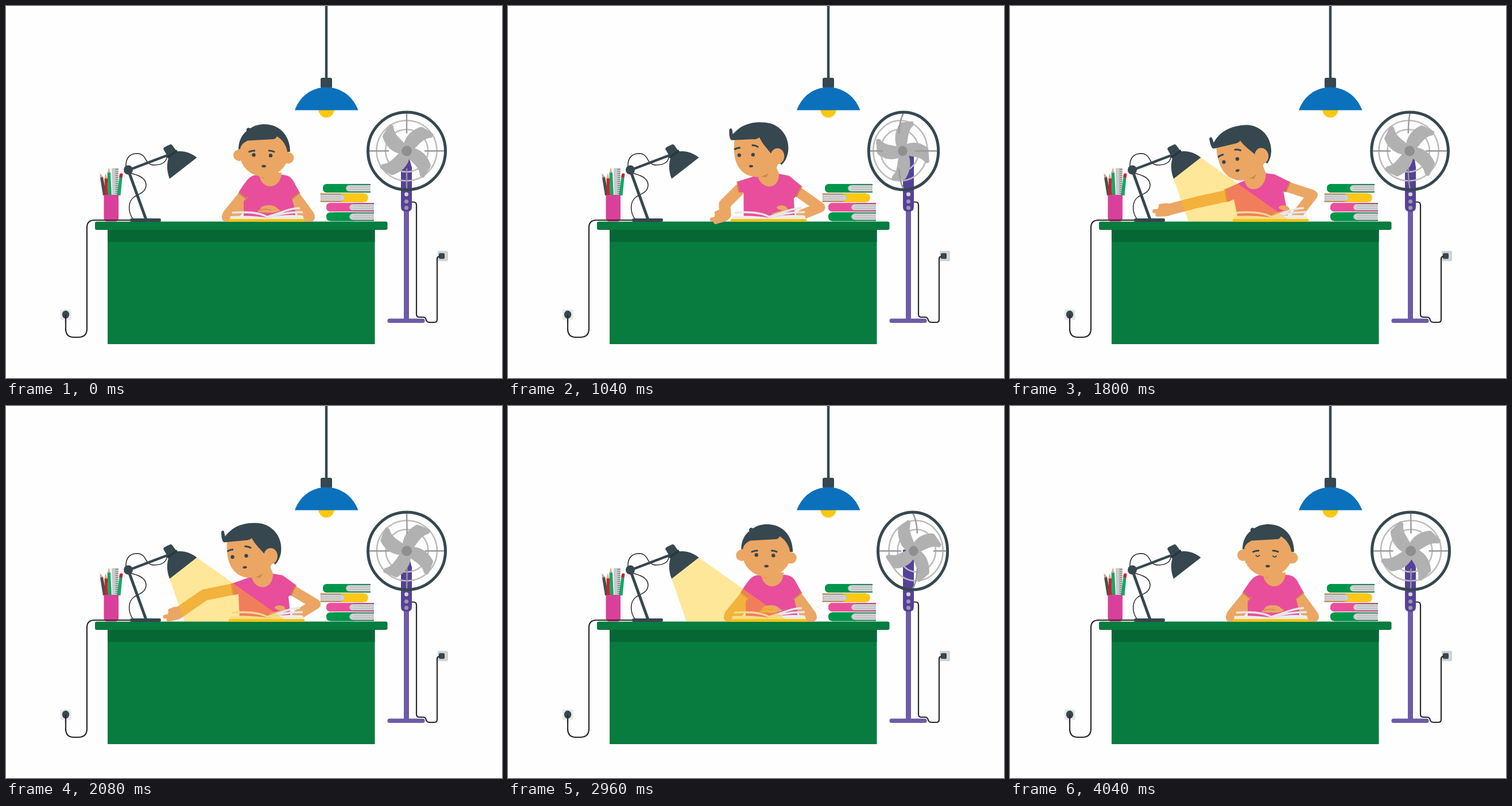
Write an HTML page that moves like this. It is 864 by 648 pixels and loops after 4.08 s.

```html
<!DOCTYPE html>
<html lang="en">
<head>
<meta charset="utf-8">
<title>Study desk</title>
<style>
html, body { margin: 0; width: 100%; height: 100%; overflow: hidden; background: #fefefe; }
svg { display: block; width: 100vw; height: 100vh; }
.dark { fill: #36474f; }
.skin { fill: #eba664; }
.shirt { fill: #e84e9b; }
.line { fill: none; stroke: #36474f; }
.wire { fill: none; stroke: #2b2729; stroke-width: 2.2; }
.limb { fill: none; stroke: #eba664; stroke-linecap: round; stroke-linejoin: round; }
.cuff { fill: none; stroke: #c98745; stroke-width: 5; }
.brow { fill: none; stroke: #36474f; stroke-width: 3; }
.page { fill: none; stroke: #e6e7e8; stroke-width: 3.5; }
</style>
</head>
<body>
<svg viewBox="0 0 864 648">
  <!-- pendant lamp -->
  <path class="line" d="M558 0V128" stroke-width="4.5"/>
  <rect class="dark" x="548" y="125" width="20" height="18" rx="3"/>
  <circle cx="558" cy="181" r="13.5" fill="#ffc80f"/>
  <path d="M503 181.5C513 154 536 141.5 558 141.5S603 154 613.5 181.5Z" fill="#0b71bc"/>

  <!-- fan stand -->
  <rect x="693" y="350" width="9" height="198" fill="#6d5ca8"/>
  <rect x="664.5" y="544.5" width="65" height="7.5" rx="3.5" fill="#6d5ca8"/>
  <path class="wire" d="M706 341.5H710Q715 341.5 715 347V537Q715 542 720 542H726Q731 542 732 547Q733 551 738 551H746Q751 551 751 546V441Q751 436 756 436"/>
  <rect x="752" y="426.5" width="18" height="18" rx="2" fill="#d1d3d4"/>
  <rect class="dark" x="754" y="430.5" width="10" height="10" rx="2"/>
  <path class="wire" d="M751 442V441Q751 436 756 436"/>
  <path d="M688 280H707V350Q707 358 699 358H696Q688 358 688 350Z" fill="#56419a"/>
  <path id="neck" fill="#56419a"/>
  <g fill="#9b97a8">
    <circle cx="697.5" cy="328" r="3.6" fill="#d1d3d4"/>
    <circle cx="697.5" cy="340.5" r="3.6"/>
    <circle cx="697.5" cy="351.5" r="3.6"/>
  </g>
  <g fill="none" stroke="#bcbcbc" stroke-width="2.6">
    <ellipse id="ringA" cy="252" ry="52.5"/>
    <ellipse id="ringB" cy="252" ry="37"/>
  </g>
  <g id="rotor" fill="#b1b1b1"></g>
  <path id="spokes" fill="none" stroke="#999" stroke-width="2.4"/>
  <ellipse id="hub" cy="252.5" ry="9" fill="#8f8f8f"/>
  <ellipse id="frame" class="line" cy="252.5" ry="67.5" stroke-width="5"/>

  <!-- desk -->
  <rect x="177" y="388" width="465.5" height="201" fill="#087b3e"/>
  <rect x="177" y="388" width="465.5" height="23" fill="#066735"/>
  <rect x="155" y="375.5" width="509.5" height="14.5" rx="3" fill="#087b3e"/>

  <!-- pencil cup -->
  <path d="M164 299L169 297.5 175 330H169Z" fill="#4d4d4d"/>
  <path d="M163.5 291L164 299.5 169 298Z" fill="#c9a07a"/>
  <path d="M171.5 300H177L178 330H172.5Z" fill="#c4262e"/>
  <path d="M173.5 291L171.5 300.5H177Z" fill="#d9b38c"/>
  <path d="M176.5 290H182L184 330H178Z" fill="#12a866"/>
  <path d="M179 281L176.5 290.5H182Z" fill="#d9b38c"/>
  <path d="M184 282.5L196 282 195.5 330H185Z" fill="#c9cbcc"/>
  <path d="M193 284V328" stroke="#666" stroke-width="5" stroke-dasharray="1 2.5"/>
  <path d="M197.5 298L202.5 299 199.5 330H193Z" fill="#12a866"/>
  <path d="M198 293Q200 290.5 203.5 292.5L202.5 299.5 197 298.5Z" fill="#c4262e"/>
  <path d="M170.5 329H196V369Q196 375.5 190 375.5H176.5Q170.5 375.5 170.5 369Z" fill="#d8409a"/>

  <!-- desk lamp -->
  <path class="wire" d="M220 373H154Q141 373 141 386V562Q141 577 126 577H118Q104 577 104 562V540"/>
  <rect x="95" y="528.5" width="18.5" height="18.5" rx="2" fill="#e6e7e8"/>
  <ellipse class="dark" cx="104" cy="537.5" rx="6.2" ry="7"/>
  <path class="wire" d="M104 552V538"/>
  <g class="wire" style="stroke-width:1.5">
    <path d="M209 281C208 264 216 257 229 257C247 258 240 277 258 277C274 277 280 270 280 262"/>
    <path d="M216 291C228 294 243 298 244 311C244 325 232 327 224 332C212 340 212 358 221 371"/>
  </g>
  <path class="line" d="M244 372L213 286" stroke-width="5"/>
  <path class="line" d="M213 286L284 259" stroke-width="4.5"/>
  <circle class="dark" cx="213" cy="285.5" r="8"/>
  <rect class="dark" x="216" y="370" width="54" height="6" rx="3"/>
  <path class="dark" d="M275 251Q273 248 276 246L285 241.5Q288 240 290 243L298 254 283 265Z"/>
  <path class="dark" d="M332.5 264L285 301C278 283 280 264 289 256C302 250 319 253 332.5 264Z"/>
  <path d="M281 264L298 252" stroke="#2a383f" stroke-width="4"/>

  <!-- stacked books -->
  <g id="books"></g>

  <!-- facing forward -->
  <g id="front">
    <path class="skin" d="M405 326L379 358Q371 374 384 376H400L414 358V345L421 334Z"/>
    <path class="skin" d="M511 326L536 360Q542 374 530 376H514L500 350 497 336Z"/>
    <path class="shirt" d="M432 295C421 298 416 309 405.5 324L419 335 414 340V372H504V357L498 335 511.5 325 500 304C495 296 488 294 478 294Z"/>
    <path class="cuff" d="M406 324L420 335M511 324L497 335"/>
    <path class="shirt" d="M409 319L422 329 418 334 406 324ZM508 319L494 330 498 335 511 324Z"/>
    <path class="skin" d="M441 290C441 322 479 322 480 290Z"/>
    <path class="skin" d="M437 359Q442 356 445 350Q450 347 458 347Q468 347 472 352L478 356Q470 361 455 360Z"/>
    <path d="M442 356Q452 352 462 356" fill="none" stroke="#c98745" stroke-width="1.5"/>
    <g id="frontHead">
      <circle class="skin" cx="406" cy="260" r="10"/>
      <circle class="skin" cx="491.5" cy="264.5" r="10"/>
      <ellipse class="skin" cx="449.5" cy="255" rx="43" ry="42.5"/>
      <path d="M445 298Q448 301 450 298" stroke="#c98745" fill="none"/>
      <path class="dark" d="M405 250C405 235 411 224 419 218Q418 213 422 212L426 213C433 208 441 206 450 206C477 206 495 226 495 254H490C489 244 482 233 472 227Q470 232 465 232L421 234.5C413 238 409 243 408 249Z"/>
      <path class="brow" d="M422.500 254.500Q428 251.500 434 252M457 252Q463 251.500 468 254.500"/>
      <ellipse class="dark" cx="449" cy="279" rx="3.8" ry="2.2"/>
      <g id="open" class="dark">
        <circle cx="431.5" cy="259.5" r="3.2"/>
        <circle cx="461" cy="260.5" r="3.2"/>
      </g>
      <path id="shut" class="line" stroke-width="1.8" d="M428 259.5Q431.5 265 435 259.5M457.5 260.5Q461 266 464.5 260.5"/>
    </g>
  </g>

  <!-- leaning to the lamp -->
  <g id="side">
    <path id="armR" class="limb" stroke-width="18"/>
    <path id="armL" class="limb" stroke-width="20"/>
    <g id="hand" class="limb">
      <ellipse class="skin" cx="-5" cy="0" rx="14" ry="11.5" stroke="none"/>
      <path d="M-2 -7L-14 -7M-8 8L-20 8" stroke-width="7"/>
      <path d="M-10 2L-25 2" stroke-width="7"/>
    </g>
    <path id="cuffs" class="cuff"/>
    <path id="torso" class="shirt"/>
    <path id="throat" class="skin"/>
    <path class="skin" d="M458 362Q470 358 478 356Q467 354 468 350Q474 345 484 349L490 358 480 366Z"/>
    <g id="sideHead">
      <path class="skin" d="M385 234C383 264 389 292 417 298.5C446 303 464 286 466 262L458 225H400Z"/>
      <path d="M434 298Q444 295 448 291L443 299Z" fill="#c98745"/>
      <path class="dark" d="M375 219Q378 215 380 219L381.5 227Q388 219 395 214C410 204 430 202 446 205C469 211 482 232 479 255Q477 268 469 276L460 268 452 260C446 252 434 242 428 230Q424 234 417 234L380 237.5Q375 236 375 219Z"/>
      <ellipse class="skin" cx="461" cy="261.5" rx="12" ry="14"/>
      <path class="brow" d="M385.5 253.5Q390 250 396 250M415.5 244.5Q422 244 427 247.5"/>
      <circle class="dark" cx="394.5" cy="263" r="3.2"/>
      <circle class="dark" cx="418.5" cy="261" r="3.2"/>
      <ellipse class="dark" cx="416" cy="281" rx="3.6" ry="2.1" transform="rotate(-8 416 281)"/>
    </g>
  </g>

  <!-- open book -->
  <path d="M391 366Q430 364 456 369Q485 362 517 365L519 371H390Z" fill="#eceded"/>
  <path class="page" d="M394 360C420 358 443 360 456 368M456 367C478 361 490 353 512 352M456 369Q482 359 517 359"/>
  <rect x="388" y="371" width="132" height="4.5" fill="#ffc20e"/>

  <path id="light" d="M285 301L332.5 264 490 375.5H311Z" fill="#ffc300" opacity=".4"/>
</svg>
<script>
const $ = id => document.getElementById(id);
const LOOP = 4080, STEP = 40;

const mix = (a, b, k) => a + (b - a) * k;
// Linear interpolation through [time, value] pairs.
function track(keys, t) {
  let i = 1;
  while (i < keys.length - 1 && t > keys[i][0]) i++;
  const [t0, v0] = keys[i - 1], [t1, v1] = keys[i];
  return mix(v0, v1, Math.min(1, Math.max(0, (t - t0) / (t1 - t0))));
}
const show = (id, on) => $(id).style.display = on ? '' : 'none';
function set(id, attrs) {
  for (const k in attrs) $(id).setAttribute(k, attrs[k]);
}

function book(x, y, color, edge, flip) {
  const place = flip ? `translate(${x + 83} ${y}) scale(-1 1)` : `translate(${x} ${y})`;
  return `<g transform="${place}">
    <path d="M83 0H8Q0 0 0 7.5T8 15H83V13H48Q40 13 40 7.5T48 2H83Z" fill="${edge}"/>
    <path d="M50 0H8Q0 0 0 7.5T8 15H50Q40 13 40 7.5T50 0Z" fill="${color}"/>
    <path d="M82 2H48Q41 2 41 7.5T48 13H82Z" fill="#d1d3d4" stroke="#a7a9ac" stroke-width=".8"/>
    <path d="M47 5.5H82M46 9.5H82" stroke="#b3b5b8"/></g>`;
}
$('books').innerHTML =
  book(552, 310, '#00964a', '#087b3e') + book(547.5, 326.5, '#ffc814', '#c9772e', true) +
  book(558, 343, '#ea4f9d', '#b8326f') + book(558, 359.5, '#00964a', '#087b3e');

$('rotor').innerHTML = [0, 90, 180, 270].map(a =>
  `<path transform="rotate(${a})" d="M-6 -7C-4 -24 8 -37 25 -42Q28 -42 30 -40L46 -30Q48 -27 43 -23C28 -22 24 -13 8 1Z"/>`).join('');

const spin = [[0, 0], [560, -164], [1480, -438], [2080, -640], [2960, -879], [3640, -1081], [4040, -1157], [4080, -1170]];
const lean = [[960, -.4], [1160, -.2], [1480, 1], [1640, 1.04], [1760, 1], [2080, 0], [2240, -.2], [2480, -.4]];
const sway = [[2480, 2], [2960, 1.2], [3400, 0]];
const gaze = [[0, 0], [560, 1]];

function drawFan(t) {
  const s = Math.sin(2 * Math.PI * t / LOOP), left = s > 0;
  const x0 = left ? 627 + 2 * (1 - s) : 629 + 14.5 * s * s;
  const x1 = left ? 767 - 16 * s * s : 767;
  const cx = (x0 + x1) / 2, k = (x1 - x0) / 138, d = -8 * s, hub = cx - 1.5 * s;
  set('frame', { cx, rx: 67.5 * k });
  set('ringA', { cx: cx + d * .7, rx: 52.5 * k });
  set('ringB', { cx: cx + d * .85, rx: 37 * k });
  set('hub', { cx: hub, rx: 9 * k });
  set('rotor', { transform: `translate(${hub} 252.5) scale(${k} 1) rotate(${track(spin, t)})` });
  const mid = cx + d, bend = cx + d * .85;
  set('spokes', { d: `M${cx} 187Q${bend} 198 ${mid} 222M${cx} 318Q${bend} 307 ${mid} 283
    M${x0 + 4} 252.5H${mid - 31 * k}M${x1 - 4} 252.5H${mid + 31 * k}` });
  const a = Math.abs(s), y = 263 - 13 * a;
  set('neck', { d: `M688 282L${mix(694, left ? 697 : 688, a)} ${y}H${mix(702, 707, a)}L707 282Z` });
}

const torso = [
  [[394, 309], [428, 297], [445, 296], [465, 292], [482, 295], [504, 311], [495, 330], [492, 332], [496, 372], [407, 372], [405, 328], [397, 329]],
  [[373, 320], [406, 305], [424, 301], [443, 291], [458, 293], [484, 305], [477, 323], [474, 322], [484, 372], [396, 372], [388, 338], [377, 343]]
];
const armR = [[[499, 321], [539, 345], [508, 364]], [[481, 314], [525, 327], [499, 364]]];
const armL = [
  [[405, 320], [385, 350], [398, 364]],
  [[396, 319], [346, 329], [301, 360]],
  [[376, 332], [322, 344], [273, 354]]
];
const blend = (a, b, k) => a.map((p, i) => [mix(p[0], b[i][0], k), mix(p[1], b[i][1], k)]);
const poly = pts => 'M' + pts.map(p => p.join(' ')).join('L');

function drawSide(u) {
  const body = blend(...torso, u), right = blend(...armR, u);
  const arm = u < 0 ? blend(armL[0], armL[1], 1 + u / .4) : blend(armL[1], armL[2], u);
  const px = 440 - 20.6 * u, py = 295 + 2.5 * u;
  set('torso', { d: poly(body) + 'Z' });
  set('cuffs', { d: poly([body[0], body[11]]) + poly([body[5], body[6]]) });
  set('armR', { d: poly(right) });
  set('armL', { d: poly(arm) });
  set('hand', { transform: `translate(${arm[2]}) rotate(${mix(-12, 0, u)})` });
  const [nl, , nr] = body.slice(1, 4);
  set('throat', { d: `M${nl}C${nl[0] + 3} ${nl[1] + 24} ${nr[0]} ${nr[1] + 32} ${nr}L${nr[0] - 8} ${nr[1] - 20} ${nl[0]} ${nl[1] - 14}Z` });
  set('sideHead', { transform: `translate(${px} ${py}) rotate(${-9 * u}) translate(-440 -295)` });
}

function draw(now) {
  // Nearest step, so that a late or early refresh keeps the right pose.
  const t = Math.round(now / STEP) * STEP % LOOP;
  const turned = t >= 960 && t < 2480, blink = t >= 3960;
  drawFan(t);
  show('front', !turned);
  show('side', turned);
  show('light', t >= 1760 && t < 3800);
  show('open', !blink);
  show('shut', blink);
  set('frontHead', { transform: `translate(${t >= 2480 ? track(sway, t) : 0} 0)` });
  set('open', { transform: `translate(${t < 960 ? track(gaze, t) : 0} 0)` });
  if (turned) drawSide(track(lean, t));
}

function tick() {
  draw(performance.now());
  requestAnimationFrame(tick);
}
tick();
</script>
</body>
</html>
```
